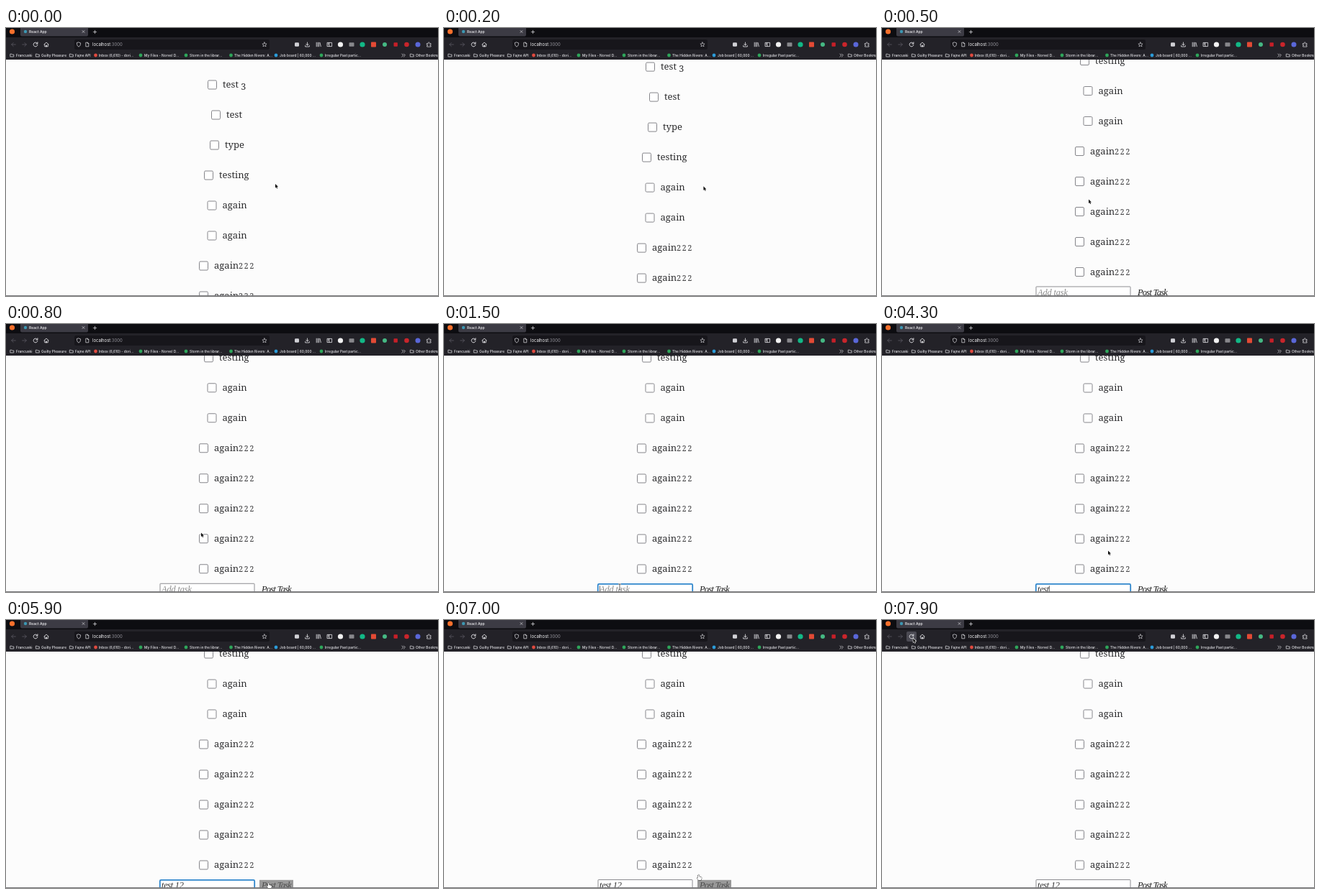
An HTML page with a canvas that plays this animation: 600 px wide and 373 px high, repeating every 8 s.

```html
<!DOCTYPE html>
<html lang="en">
<head>
<meta charset="utf-8">
<title>Task list</title>
<style>
html, body { margin: 0; width: 100%; height: 100%; overflow: hidden; background: #fcfcfc; }
canvas { display: block; width: 600px; height: 373px; }
</style>
</head>
<body>
<canvas id="stage"></canvas>
<script>
const W = 600, H = 373, LOOP = 8000, STEP = 100;
const canvas = document.getElementById('stage');
const ctx = canvas.getContext('2d');
const dpr = window.devicePixelRatio || 1;
canvas.width = W * dpr;
canvas.height = H * dpr;

const UI = 'Inter, "Open Sans", sans-serif';
const SERIF = '"Noto Serif", serif';
const SCRIPT = 'italic 12.4px "Liberation Serif", serif';
const LIGHT = '#e6e6ea', DIM = '#5b5a63', TOOLBAR = '#232228';

// Label and its left edge
const tasks = [
  ['test 3', 301], ['test', 306], ['type', 304], ['testing', 296],
  ['again', 300.5], ['again', 300.5],
  ...Array.from({ length: 5 }, () => ['again222', 289])
];

// Keyframes: time, value...
const scrollKeys = [[100, 0], [500, 159.5], [900, 158]];
const pointerKeys = [
  [100, 374, 217], [500, 287, 238.5], [900, 268, 300], [1400, 244, 366],
  [3700, 244, 366], [4300, 314, 315.5], [5200, 314, 315.5], [5800, 365, 366.5],
  [6900, 365, 366.5], [7800, 43, 25], [7900, 43.3, 25.4]
];
const typingKeys = [[0, ''], [3000, 't'], [3200, 'te'], [3400, 'tes'], [3600, 'test'],
  [4600, 'test '], [5000, 'test 1'], [5200, 'test 12']];

function tween(keys, t) {
  if (t <= keys[0][0]) return keys[0].slice(1);
  for (let i = 1; i < keys.length; i++) {
    const a = keys[i - 1], b = keys[i];
    if (t <= b[0]) {
      const p = (t - a[0]) / (b[0] - a[0]);
      const e = p * p * (3 - 2 * p);
      return a.slice(1).map((v, k) => v + (b[k + 1] - v) * e);
    }
  }
  return keys[keys.length - 1].slice(1);
}

const within = (t, ...spans) => spans.some(([a, b]) => t >= a && t < b);

function text(s, x, y, font, color, spacing = 0) {
  ctx.font = font;
  ctx.letterSpacing = spacing + 'px';
  ctx.fillStyle = color;
  ctx.fillText(s, x, y);
  return ctx.measureText(s).width;
}

function box(x, y, w, h, r, fill, stroke, lw = 1) {
  ctx.beginPath();
  ctx.roundRect(x, y, w, h, r);
  if (fill) { ctx.fillStyle = fill; ctx.fill(); }
  if (stroke) { ctx.strokeStyle = stroke; ctx.lineWidth = lw; ctx.stroke(); }
}

function dot(x, y, r, color) {
  ctx.beginPath();
  ctx.arc(x, y, r, 0, Math.PI * 2);
  ctx.fillStyle = color;
  ctx.fill();
}

function path(d, x, y, stroke, lw = 0.8, fill) {
  const p = new Path2D(d);
  ctx.save();
  ctx.translate(x, y);
  ctx.lineCap = ctx.lineJoin = 'round';
  if (stroke) { ctx.strokeStyle = stroke; ctx.lineWidth = lw; ctx.stroke(p); }
  if (fill) { ctx.fillStyle = fill; ctx.fill(p); }
  ctx.restore();
}

// Old-style figures: 2 sits at x-height, 3 hangs below the baseline
function taskLabel(s, x, y) {
  for (const run of s.match(/2+|3+|[^23]+/g)) {
    const [size, drop, gap] = run[0] === '2' ? [10.3, 0, 1.9] : run[0] === '3' ? [12.5, 3, 0] : [13, 0, 0];
    x += text(run, x, y + drop, `300 ${size}px ${SERIF}`, '#2e2e30', gap);
  }
}

function drawTasks(scroll) {
  tasks.forEach(([label, x], i) => {
    const y = 79 + 42 * i - scroll;
    if (y < 30 || y > 385) return;
    box(x - 20.5, y - 6, 12, 12, 1.5, '#fff', '#85858a', 1);
    taskLabel(label, x, y + 4.4);
  });
}

function drawForm(t, scroll) {
  const top = 519.3 - scroll, base = top + 12;
  const focused = within(t, [1400, 6400]);
  const typed = typingKeys.filter(k => k[0] <= t).pop()[1];
  if (focused) box(213.8, top + 0.6, 131.4, 24, 1.5, '#fff', '#2f86cc', 1.8);
  else box(214, top + 0.2, 131, 24, 0.5, '#fff', '#8c8c90', 1);

  let width = 0;
  if (typed) width = text(typed, 216, base, SCRIPT, '#333', -0.3);
  else text('Add task', 216, base, SCRIPT, '#8b8b8b', -0.15);
  if (within(t, [1400, 2000], [2600, 5700])) {
    ctx.fillStyle = '#333';
    ctx.fillRect(216 + width, top + 3, 0.7, 12);
  }

  const hover = within(t, [5700, 7100]);
  if (hover) {
    ctx.fillStyle = '#999';
    ctx.fillRect(352, top + 0.5, 47, 24);
  }
  text('Post Task', 355, base, SCRIPT, hover ? '#4c4c4c' : '#1c1c1c', -0.7);
}

const folder = (x) => path('M-2.3-1.8h1.7l.7.8h2.2v2.9h-4.6z', x, 38, LIGHT, 0.7);

function drawTabs() {
  ctx.fillStyle = '#0d0d11';
  ctx.fillRect(0, 0, W, 13);
  dot(8.5, 5, 3.6, '#f9702c');
  box(20, -2, 94, 13.5, 2, '#3c3b44');
  dot(27, 5, 2.2, '#3d97b3');
  text('React App', 32, 7.1, `500 5px ${UI}`, '#f4f4f6');
  path('M-1.5-1.5l3 3m0-3l-3 3', 107.5, 5, LIGHT, 0.6);
  path('M-2.2 0h4.4M0-2.2v4.4', 123.5, 5.5, LIGHT, 0.7);
}

function drawToolbar(t) {
  ctx.fillStyle = TOOLBAR;
  ctx.fillRect(0, 13, W, 31);
  if (within(t, [7700, LOOP])) box(34, 16, 14, 14, 2, '#4b4a53');

  path('M2.8 0h-5.6M-.3-2.5l-2.5 2.5 2.5 2.5', 10.5, 23, DIM);
  path('M-2.8 0h5.6M.3-2.5l2.5 2.5-2.5 2.5', 25.5, 23, DIM);
  path('M2.6-1.4A2.9 2.9 0 1 0 2.9.6M2.9-3.2v2.2h-2.2', 41, 23, LIGHT, 0.9);
  path('M-3.2-.1L0-3l3.2 2.9M-2.3-.6v3.4h4.6v-3.4M-.5 2.8v-1.8h1v1.8', 56, 23, LIGHT, 0.8);

  box(95, 16, 271, 14, 2.5, '#17161b');
  path('M0-3l2.6.9c0 2.6-.7 4.3-2.6 5.2-1.9-.9-2.6-2.6-2.6-5.2z', 101, 23, LIGHT, 0.7);
  path('M-1.8-2.8h2.2l1.4 1.4v4.2h-3.6zM.4-2.8v1.4h1.4', 113, 23, LIGHT, 0.7);
  const w = text('localhost', 120, 25.2, `400 5.9px ${UI}`, '#f4f4f6');
  text(':3000', 120 + w, 25.2, `400 5.9px ${UI}`, '#929199');
  path('M0-3.1l.9 2 2.2.2-1.6 1.5.5 2.2-2-1.2-2 1.2.5-2.2-1.6-1.5 2.2-.2z', 359, 23, LIGHT, 0.6);

  box(401, 20.2, 6, 5.6, 1.4, '#d0d0d5');
  path('M0-3v4M-1.8-.7l1.8 1.8 1.8-1.8M-2.8 1.5v1.5h5.6v-1.5', 418.5, 23, LIGHT, 0.8);
  path('M-2.8-2.8v5.6M-1-2.8v5.6M.7-2.8v5.6M2-2.6l1.3 5.3', 434, 23, LIGHT, 0.8);
  path('M-3.1-2.6h6.2v5.2h-6.2zM-.6-2.6v5.2M-2.2-1.2h.7M-2.2 0h.7', 449.5, 23, LIGHT, 0.8);

  dot(464.5, 23, 3.6, '#f2f2f2');
  box(476.5, 20.2, 7, 5.6, 0.8, '#88888c');
  dot(495, 23, 3.6, '#12b886');
  box(507, 19.6, 7, 7, 0.8, '#e34a35');
  dot(526, 23, 3, '#45b883');
  box(538.5, 20.2, 5.4, 5.6, 0.8, '#c61f28');
  dot(556.5, 23, 3.3, '#c9252b');
  dot(572, 23, 3.5, '#5a67d8');
  path('M-2.8-1.4h1.7c-.6-2.4 2.4-2.4 1.8 0h1.9v1.6c-1.9-.5-1.9 1.8 0 1.4v1.5h-5.4v-1.6c1.7.3 1.7-1.8 0-1.4z', 587.5, 23, LIGHT, 0.7);
}

const bookmarks = [
  [8.5, 14, 'Francuski'], [44, 49, 'Guilty Pleasure'], [91, 96, 'Fajne API'],
  [124.5, 129, 'Inbox (6,610) - dori…', '#e04a3f'],
  [187, 192, 'My Files - Norvel D…', '#2ea65a'],
  [250, 255, 'Storm in the librar…', '#2ea65a'],
  [312.5, 317, 'The Hidden Rivers: A…', '#2ea65a'],
  [375, 380, 'Job board | 60,000 …', '#2b9bd8'],
  [438, 443, 'Irregular Past partic…', '#2ea65a'],
  [564, 569, 'Other Bookmarks']
];

function drawBookmarks() {
  for (const [icon, x, label, color] of bookmarks) {
    if (color) dot(icon, 38, 2.4, color);
    else folder(icon);
    text(label, x, 39.8, `500 4.85px ${UI}`, LIGHT);
  }
  path('M-2.2-2l2 2-2 2M.4-2l2 2-2 2', 552, 38, LIGHT, 0.7);
}

function drawPointer(t) {
  if (within(t, [3000, 3800], [4600, 5300])) return;
  const [x, y] = tween(pointerKeys, t);
  if (within(t, [1400, 3900])) {
    path('M-1.4-4h1l.4.4.4-.4h1M0-3.6v7.2M-1.4 4h1l.4-.4.4.4h1', x, y, '#fff', 1.5);
    path('M-1.4-4h1l.4.4.4-.4h1M0-3.6v7.2M-1.4 4h1l.4-.4.4.4h1', x, y, '#222', 0.7);
  } else if (within(t, [5700, 7100])) {
    path('M-1 0q.8-1 1.4 0l.2 2.5 2.6.6q1 .3.7 1.6l-.7 2.6h-3.6l-2.4-3q0-1.2 1.6-.3z', x, y, '#222', 0.9, '#fff');
  } else {
    path('M0 0v5.6l1.3-1.1.9 2 1-.4-.9-2h1.7z', x, y, '#fff', 1.1, '#111');
  }
}

function draw(t) {
  ctx.setTransform(dpr, 0, 0, dpr, 0, 0);
  ctx.fillStyle = '#fcfcfc';
  ctx.fillRect(0, 0, W, H);
  const [scroll] = tween(scrollKeys, t);
  drawTasks(scroll);
  drawForm(t, scroll);
  drawTabs();
  drawToolbar(t);
  drawBookmarks();
  ctx.fillStyle = '#77777a';
  ctx.fillRect(0, 372, W, 1);
  drawPointer(t);
}

function loop() {
  const t = performance.now() % LOOP;
  draw(Math.floor(t / STEP) * STEP);
  requestAnimationFrame(loop);
}
loop();
</script>
</body>
</html>
```
